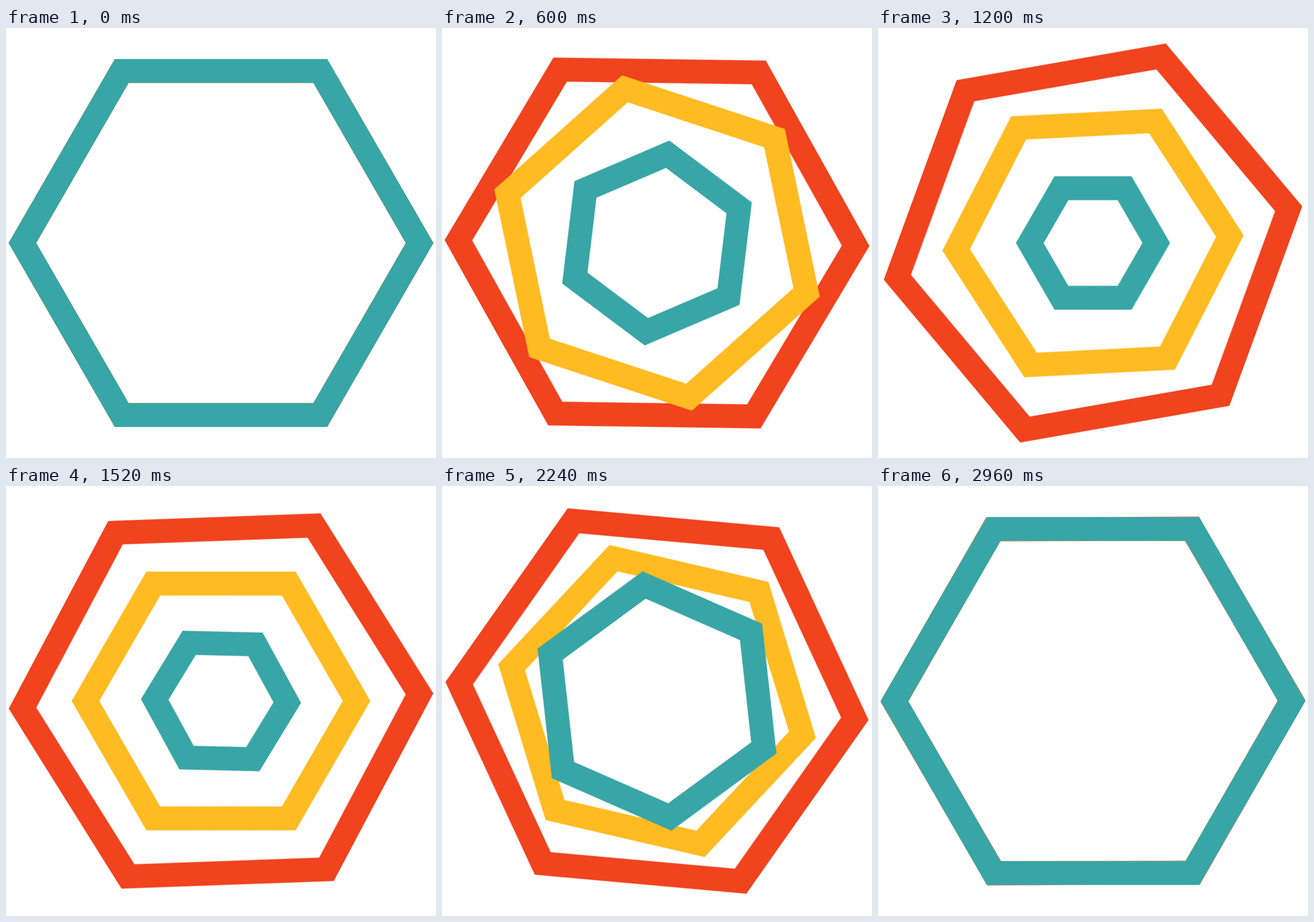
An HTML page for the animation above (3 s loop, 748 by 748 pixels).

```html
<!DOCTYPE html>
<html lang="en">
<head>
<meta charset="utf-8">
<title>Turning hexagons</title>
<style>
  html, body {
    margin: 0;
    width: 100%;
    height: 100%;
    overflow: hidden;
    background: #fff;
  }
  svg {
    display: block;
    width: 100vw;
    height: 100vh;
  }
  .ring {
    fill: none;
    stroke-width: 41.57px;
    stroke-linejoin: miter;
    vector-effect: non-scaling-stroke;
    transform-origin: 0 0;
    animation: 3s linear infinite;
  }
  .red    { stroke: #f0431e; animation-name: red; }
  .yellow { stroke: #ffbb22; animation-name: yellow; }
  .teal   { stroke: #38a5a6; animation-name: teal; }

  /* Each ring turns 120° while shrinking, rests, then turns 60° while growing. */
  @keyframes red {
    0%          { transform: rotate(0deg) scale(1); animation-timing-function: cubic-bezier(.333, 0, .2, 1); }
    61.11%      { transform: rotate(120deg) scale(1); animation-timing-function: cubic-bezier(.8, 0, .667, 1); }
    100%        { transform: rotate(180deg) scale(1); }
  }
  @keyframes yellow {
    0%          { transform: rotate(0deg) scale(1); animation-timing-function: cubic-bezier(.333, 0, .2, 1); }
    50%         { transform: rotate(120deg) scale(.6825); }
    51%         { transform: rotate(120deg) scale(.6825); animation-timing-function: cubic-bezier(.8, 0, .667, 1); }
    97.7%, 100% { transform: rotate(180deg) scale(1); }
  }
  @keyframes teal {
    0%          { transform: rotate(0deg) scale(1); animation-timing-function: cubic-bezier(.333, 0, .2, 1); }
    38.89%      { transform: rotate(120deg) scale(.3184); }
    40%         { transform: rotate(120deg) scale(.3184); animation-timing-function: cubic-bezier(.8, 0, .667, 1); }
    95.5%, 100% { transform: rotate(180deg) scale(1); }
  }
</style>
</head>
<body>
<svg viewBox="-374 -374 748 748">
  <polygon class="ring red" points="345.5,0 172.75,299.2 -172.75,299.2 -345.5,0 -172.75,-299.2 172.75,-299.2"/>
  <polygon class="ring yellow" points="345.5,0 172.75,299.2 -172.75,299.2 -345.5,0 -172.75,-299.2 172.75,-299.2"/>
  <polygon class="ring teal" points="345.5,0 172.75,299.2 -172.75,299.2 -345.5,0 -172.75,-299.2 172.75,-299.2"/>
</svg>
</body>
</html>
```
